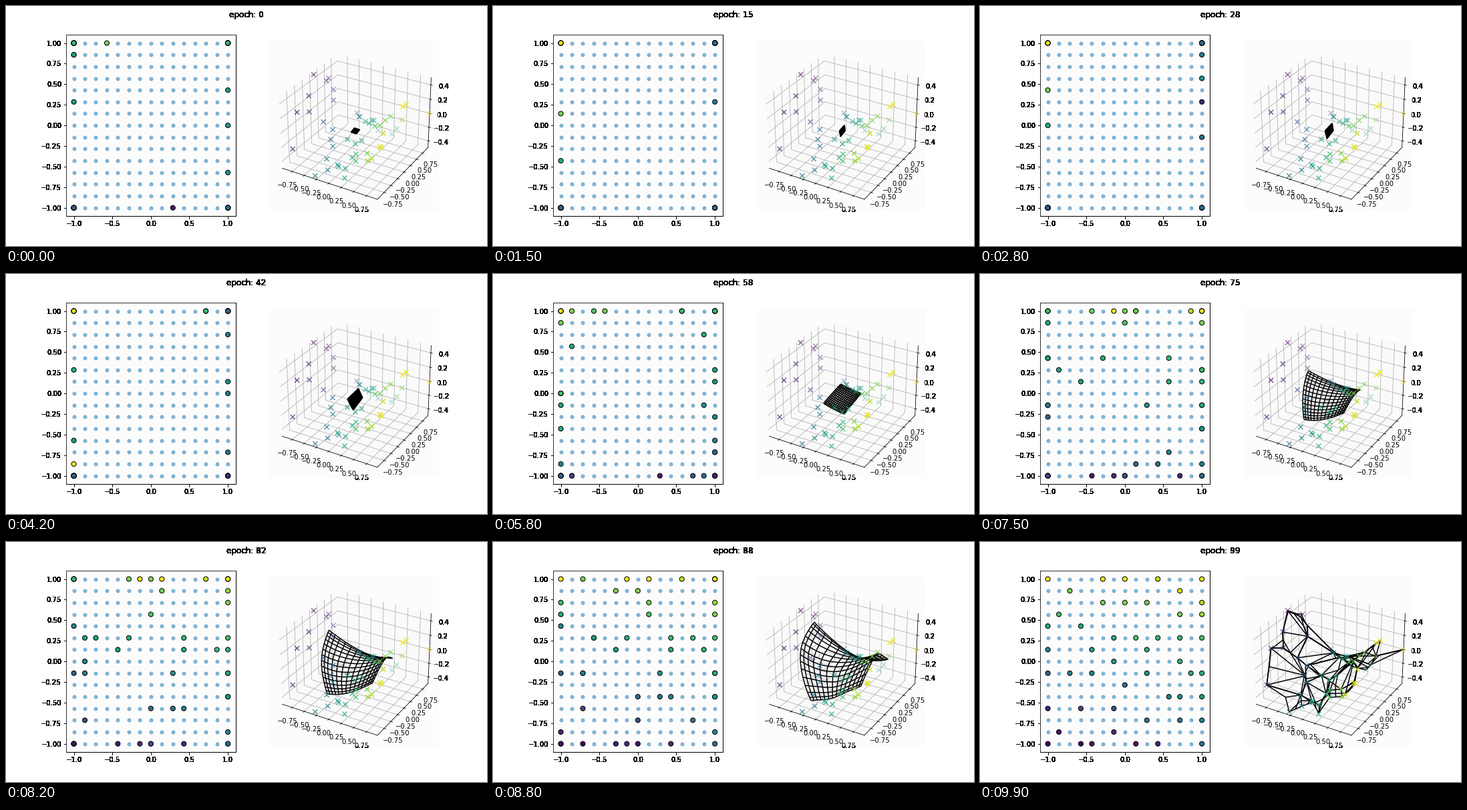
These frames come from a looping animation (720 px wide and 360 px high, 10 s). A matplotlib script:

```python
import numpy as np
import matplotlib.pyplot as plt
from matplotlib.animation import FuncAnimation
from mpl_toolkits.mplot3d.art3d import Line3DCollection

W, H, DPI = 720, 360, 72
EPOCHS, SIDE, POINTS = 100, 15, 50
PAPER = "#fcfcfc"


def crisp(img, dpi):
    """Turn all ink outside the two axes solid black."""
    k = img.shape[0] / H
    outside = np.ones(img.shape[:2], bool)
    for x0, y0, x1, y1 in ((90, 43, 344, 315), (394, 52, 648, 306)):
        outside[round(y0 * k):round(y1 * k), round(x0 * k):round(x1 * k)] = False
    out = (img * 255).round().astype(np.uint8)
    out[outside & (img[..., :3].min(axis=-1) < .98), :3] = 0
    return out, 0, 0


def best_units(data, weights):
    return ((data[:, None] - weights) ** 2).sum(-1).argmin(1)


def train(data, nodes):
    """Batch self-organizing map; yields weights and winners per epoch."""
    dist = ((nodes[:, None] - nodes) ** 2).sum(-1)
    gx, gy = nodes.T
    weights = data.mean(0) + .04 * np.column_stack([gy, -gx, 0 * gx])
    wins = best_units(data, weights)
    for sigma in np.linspace(4, .1, EPOCHS):
        near = np.exp(-dist[wins] / sigma ** 2)
        weights = near.T @ data / near.sum(0)[:, None]
        wins = best_units(data, weights)
        yield weights, wins


def mesh(weights):
    sheet = weights.reshape(SIDE, SIDE, 3)
    return np.concatenate([sheet, sheet.transpose(1, 0, 2)])


# Samples on a saddle surface, and the square grid of units
np.random.seed(0)
x, y = np.random.uniform(-1, 1, (2, POINTS))
data = np.column_stack([x, y, (x ** 2 - y ** 2) / 2])
line = np.linspace(-1, 1, SIDE)
nodes = np.column_stack([g.ravel() for g in np.meshgrid(line, line)])
history = list(train(data, nodes))

plt.rcParams.update({"font.family": "DejaVu Sans", "font.size": 10,
                     "figure.subplot.bottom": .125})
fig = plt.figure(figsize=(W / DPI, H / DPI), dpi=DPI, facecolor="white")
fig.set_agg_filter(crisp)
title = fig.suptitle("epoch: 0")

flat = fig.add_subplot(121, facecolor=PAPER)
flat.set(xlim=(-1.1, 1.1), ylim=(-1.1, 1.1))
flat.scatter(*nodes.T, s=25, alpha=.5)
hits = flat.scatter(*nodes[history[0][1]].T, s=50, c=x,
                    edgecolors="black", linewidths=1)

space = fig.add_subplot(122, projection="3d", facecolor=PAPER)
space.scatter(*data.T, c=x, s=50, marker="x")
wire = Line3DCollection(mesh(history[0][0]), colors="black", linewidths=1.5)
space.add_collection3d(wire)
quarters = np.arange(-3, 4) / 4
space.set(xlim=(x.min(), x.max()), ylim=(y.min(), y.max()), zlim=(-.5, .5),
          xticks=quarters, yticks=quarters, zticks=np.arange(-2, 3) / 5)
for axis in (space.xaxis, space.yaxis, space.zaxis):
    axis.set_pane_color((.98, .98, .98, 1))


def update(epoch):
    weights, wins = history[epoch]
    title.set_text(f"epoch: {epoch}")
    hits.set_offsets(nodes[wins])
    wire.set_segments(mesh(weights))
    return title, hits, wire


anim = FuncAnimation(fig, update, frames=EPOCHS, interval=100, repeat=True)
plt.show()
```
